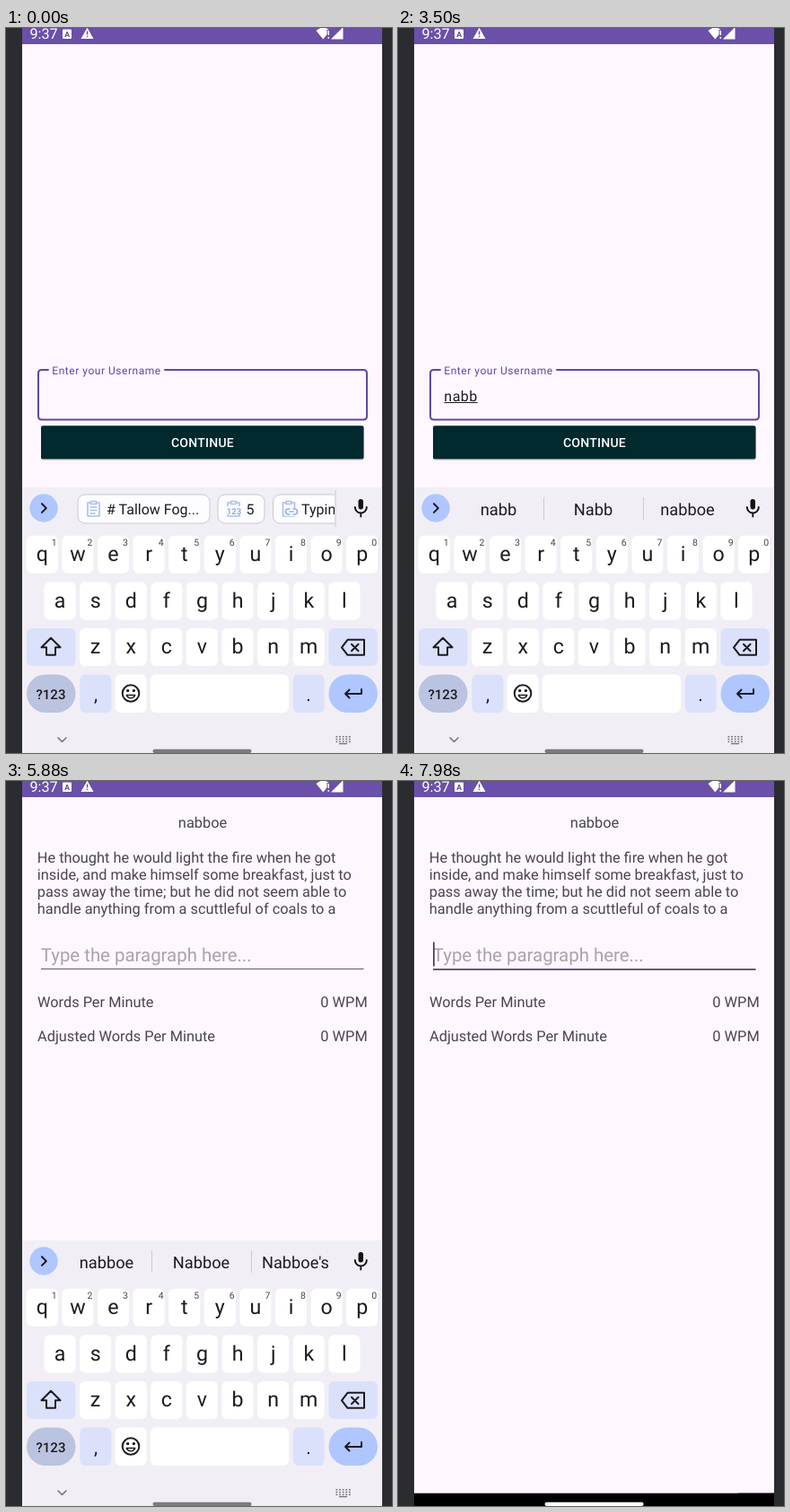
An HTML page for the animation above (8000 ms loop, 430x808 px).

```html
<!DOCTYPE html>
<html lang="en">
<head>
<meta charset="utf-8">
<style>
html, body { margin: 0; width: 100%; height: 100%; overflow: hidden; background: #2b2c30; }
svg { display: block; font-family: Roboto, sans-serif; text-rendering: geometricPrecision; }
text { white-space: pre; }
.mid { text-anchor: middle; }
.line { fill: none; stroke-linecap: round; stroke-linejoin: round; }
</style>
</head>
<body>
<svg id="stage" width="430" height="808" viewBox="0 0 430 808"></svg>
<script>
const LOOP = 8000, NAME = 'nabboe', INK = '#1d1b20', GREY = '#49454f', ACCENT = '#6048a0';
const COMMITS = [1100, 1735, 2590, 2990, 3700, 4550];   // a letter appears on key release
const PRESSES = [980, 1680, 2520, 2850, 3570, 4480];
const PITCH = 39.6, BODY = 16.35;

const rect = (x, y, w, h, fill, r = 0, more = '') =>
  `<rect x="${x}" y="${y}" width="${w}" height="${h}" fill="${fill}" rx="${r}" ${more}/>`;
const text = (x, y, size, fill, str, more = '') =>
  `<text x="${x}" y="${y}" font-size="${size}" fill="${fill}" ${more}>${str}</text>`;
const mid = (x, y, size, fill, str, more = '') => text(x, y, size, fill, str, 'class="mid" ' + more);
const line = (d, color, width, more = '') =>
  `<path class="line" d="${d}" stroke="${color}" stroke-width="${width}" ${more}/>`;
const group = (id, body) => `<g id="${id}">${body}</g>`;

// Keyboard
const keyPos = {};
function letterRow(letters, left, top, hints = '') {
  return [...letters].map((c, i) => {
    const x = left + i * PITCH;
    keyPos[c] = { x, top };
    return rect(x - 17.5, top, 35, 42, '#fff', 6) + mid(x, top + 28.2, 23.2, INK, c) +
      (hints ? mid(x + 13.5, top + 11.5, 10.5, '#46464d', hints[i]) : '');
  }).join('');
}

const clipboard = x =>
  line(`M${x + 4} 529h-3v15h13v-15h-3M${x + 4.5} 527.5h6v3h-6z`, '#a9c0ea', 1.6);
const chip = (x, w, label, labelX) =>
  rect(x, 520, w, 32, '#fdfcff', 8, 'stroke="#c9c8d0"') + clipboard(x + 10) + text(labelX, 542, 16, INK, label);

const chips = '<g clip-path="url(#strip)">' +
  chip(80, 147, '# Tallow Fog...', 112) +
  line('M94 534h7M94 537.5h7M94 541h5', '#a9c0ea', 1.4) +
  chip(236, 52, '5', 267.5) +
  rect(245, 533, 18, 9, '#fdfcff') + mid(254, 541.5, 9.5, '#8fafe6', '123', 'font-weight="700"') +
  chip(297.5, 120, 'Typing', 329) +
  rect(311, 535, 14, 9, '#fdfcff') +
  line('M316 536h-1.5a3 3 0 0 0 0 6h1.5M320 536h1.5a3 3 0 0 1 0 6h-1.5M316 539h4', '#8fafe6', 1.6) + '</g>';

const suggestions = [112, 217.5, 322.5].map((x, i) => mid(x, 542.5, 18.2, INK, '', `id="word${i}"`)).join('') +
  rect(162, 523, 1, 25, '#cbcad1') + rect(273, 523, 1, 25, '#cbcad1');

const mic = rect(392.5, 525, 5.5, 11.5, '#111', 2.75) +
  line('M388.8 534a6.5 6.5 0 0 0 13 0M395.3 540.5v4', '#111', 1.9);

let tinyKeys = '';
for (let i = 0; i < 15; i++) tinyKeys += rect(367.5 + i % 5 * 3.6, 789 + (i / 5 | 0) * 2.8, 1.8, 1.6, '#77767d');
tinyKeys += rect(371, 797, 9, 1.3, '#77767d');

const keyboard = rect(18, 512, 401, 296, '#f1eff5') +
  '<circle cx="42" cy="535" r="15.7" fill="#afc6ff"/>' + line('M40 530.3l4.8 4.8l-4.8 4.8', '#15151a', 2) +
  group('chips', chips) + rect(366.5, 515, 1, 41, '#cbcad1', 0, 'id="divider"') + group('words', suggestions) + mic +
  letterRow('qwertyuiop', 40.3, 565.8, '1234567890') +
  letterRow('asdfghjkl', 60.1, 617.4) +
  letterRow('zxcvbnm', 99.6, 669) +
  rect(23, 669, 54.5, 42, '#dbe1fb', 6) + rect(359.5, 669, 54.5, 42, '#dbe1fb', 6) +
  line('M50 679.8l10.5 10.5h-5.5v8.5h-10v-8.5h-5.5z', INK, 2) +
  line('M380.5 681.8h18.5v17h-18.5l-6.5-8.5zM385 686.8l7.5 7.5M392.5 686.8l-7.5 7.5', INK, 2) +
  rect(23, 720.5, 54.5, 42.5, '#bac4e0', 21) + mid(50, 747.5, 15, INK, '?123', 'font-weight="500"') +
  rect(82.3, 720.5, 35, 42.5, '#dbe1fb', 6) + mid(100, 750, 21, INK, ',') +
  rect(121.5, 720.5, 35, 42.5, '#fff', 6) +
  '<circle cx="139" cy="741.5" r="9.3" fill="none" stroke="#1d1b20" stroke-width="2"/>' +
  '<circle cx="135.6" cy="738.5" r="1.6"/><circle cx="142.4" cy="738.5" r="1.6"/>' +
  line('M134.3 743.5a5 5 0 0 0 9.4 0z', INK, 1.5) +
  rect(161, 720.5, 154, 42.5, '#fff', 6) +
  rect(319.7, 720.5, 35, 42.5, '#dbe1fb', 6) + mid(337, 750, 21, INK, '.') +
  rect(359.5, 720.5, 54.5, 42.5, '#afc6ff', 21) +
  line('M396 737v5h-18M382.5 737.5l-4.5 4.5l4.5 4.5', INK, 2) +
  line('M58 791l4.5 4.5l4.5-4.5', '#77767d', 1.6) + tinyKeys;

// Pages
const sheet = rect(18, 18, 401, 775.5, '#fef7ff');
const loginPage = sheet +
  line('M47 381H40q-4 0-4 4V432.5q0 4 4 4H398q4 0 4-4V385q0-4-4-4H177', ACCENT, 2) +
  text(51.3, 386.3, 12, ACCENT, 'Enter your Username', 'letter-spacing=".53"') +
  text(51.3, 415.5, 16, INK, '', 'id="typed" letter-spacing=".5"') +
  rect(51.5, 417, 0, 1, INK, 0, 'id="mark"') + rect(51, 398, 1.6, 22, '#4a4466', 0, 'id="caret"') +
  rect(39, 445, 359.5, 37, '#000', 2, 'opacity=".13"') + rect(39, 444, 359.5, 37, '#000', 2, 'opacity=".2"') +
  rect(39, 443.3, 359.5, 37, '#01292e', 2) + rect(39, 443.3, 359.5, 37, '#fff', 2, 'id="ripple"') +
  mid(219, 467, 14, '#fff', 'CONTINUE', 'font-weight="500" letter-spacing=".25"');

const story = ['He thought he would light the fire when he got', 'inside, and make himself some breakfast, just to',
  'pass away the time; but he did not seem able to', 'handle anything from a scuttleful of coals to a'];
const stat = (y, label) => text(35, y, BODY, GREY, label) + text(402.7, y, BODY, GREY, '0 WPM', 'text-anchor="end"');
const typingPage = sheet +
  mid(219, 52.3, BODY, GREY, NAME) +
  story.map((s, i) => text(34.8, 90.8 + i * 19.2, BODY, GREY, s)).join('') +
  text(38.8, 201.3, 20.4, '#a8a3aa', 'Type the paragraph here...') +
  rect(39, 209, 359.5, 1, '#5e5a63', 0, 'id="rule"') + rect(39, 179.5, 1.8, 27, '#4a475c', 0, 'id="caret2"') +
  stat(251.5, 'Words Per Minute') + stat(290, 'Adjusted Words Per Minute');

const statusBar = rect(18, 0, 401, 18, '#6a50a8') +
  text(26.5, 11.8, 16.2, '#fff', '9:37') +
  rect(63, 1.5, 10, 10.5, '#fff', 1) + mid(68, 10, 8.5, '#5b4690', 'A', 'font-weight="700"') +
  '<path d="M90.5 -.5l7 12.5h-14z" fill="#fff"/>' + rect(89.8, 3.5, 1.5, 4, '#6a50a8') + rect(89.8, 8.7, 1.5, 1.5, '#6a50a8') +
  '<path d="M345.5 3q8-7 15.5 0l-7.7 9.5zM375.5 -1v13.5h-13.5z" fill="#fff"/>' +
  rect(357.5, 2, 3.5, 11, '#6a50a8') + rect(358.5, 3, 1.5, 5, '#fff') + rect(358.5, 10, 1.5, 1.8, '#fff');

const popup = rect(-31, 0, 62, 80, '#000', 9, 'opacity=".1"') + rect(-30.5, 0, 61, 79, '#fff', 8) +
  mid(0, 48, 32, INK, '', 'id="popLetter"');

const stage = document.getElementById('stage');
stage.innerHTML = '<clipPath id="strip"><rect x="60" y="512" width="306" height="44"/></clipPath>' +
  rect(18, 0, 401, 808, '#000') + group('login', loginPage) + group('typing', typingPage) +
  group('keys', keyboard) + group('popup', popup) +
  rect(0, 0, 18, 808, '#2b2c30') + rect(419, 0, 11, 808, '#2b2c30') + statusBar +
  rect(163.5, 803.7, 110, 4.3, '#7b7a7e', 2, 'id="handle"');

const el = id => document.getElementById(id);
const show = (id, on) => { el(id).style.display = on ? '' : 'none'; };
const set = (id, attrs) => { for (const k in attrs) el(id).setAttribute(k, attrs[k]); };
const shift = (id, x, y) => set(id, { transform: `translate(${x} ${y})` });
const ramp = (t, a, b) => Math.min(1, Math.max(0, (t - a) / (b - a)));
const smooth = p => p * p * (3 - 2 * p);
const cap = s => s[0].toUpperCase() + s.slice(1);

function suggest(s) {
  if (s === NAME) return [s, cap(s), cap(s) + "'s"];
  return [s, cap(s), s.length > 3 ? NAME : NAME.slice(0, s.length + 1)];
}

function draw(t) {
  const count = COMMITS.filter(c => t >= c).length;
  const typed = NAME.slice(0, count);

  el('typed').textContent = typed;
  const width = count ? el('typed').getComputedTextLength() : 0;
  set('mark', { width: Math.max(0, width - .5) });
  set('caret', { x: 51 + width });
  const since = t - (count ? COMMITS[count - 1] : 70);
  show('caret', since >= 0 && since % 1000 < 500);

  show('chips', !count);
  show('divider', count < 2);
  show('words', count > 1);
  if (count > 1) suggest(typed).forEach((w, i) => { el('word' + i).textContent = w; });

  const pressed = PRESSES.findIndex((p, i) => t >= p && t < COMMITS[i]);
  show('popup', pressed >= 0);
  if (pressed >= 0) {
    const c = NAME[pressed], key = keyPos[c];
    el('popLetter').textContent = c;
    shift('popup', key.x, Math.max(515, key.top - 80));
  }

  set('ripple', { opacity: t < 5530 ? 0 : .2 * (1 - ramp(t, 5600, 5880)) });
  const enter = 1 - (1 - ramp(t, 5600, 5870)) ** 3;
  shift('login', -40 * enter, 0);
  shift('typing', 40 * (1 - enter), 0);
  set('typing', { opacity: enter });
  shift('keys', 0, 296 * smooth(ramp(t, 5960, 6440)));

  const focused = t >= 7420;
  show('caret2', focused);
  set('rule', focused ? { height: 2, fill: '#625c78' } : { height: 1, fill: '#5e5a63' });
  const glow = ramp(t, 6700, 7000), mix = v => Math.round(v + (255 - v) * glow);
  set('handle', { fill: `rgb(${mix(123)},${mix(122)},${mix(126)})` });
}

const start = performance.now();
function frame() {
  draw((performance.now() - start) % LOOP);
  requestAnimationFrame(frame);
}
draw(0);
requestAnimationFrame(frame);
</script>
</body>
</html>
```
